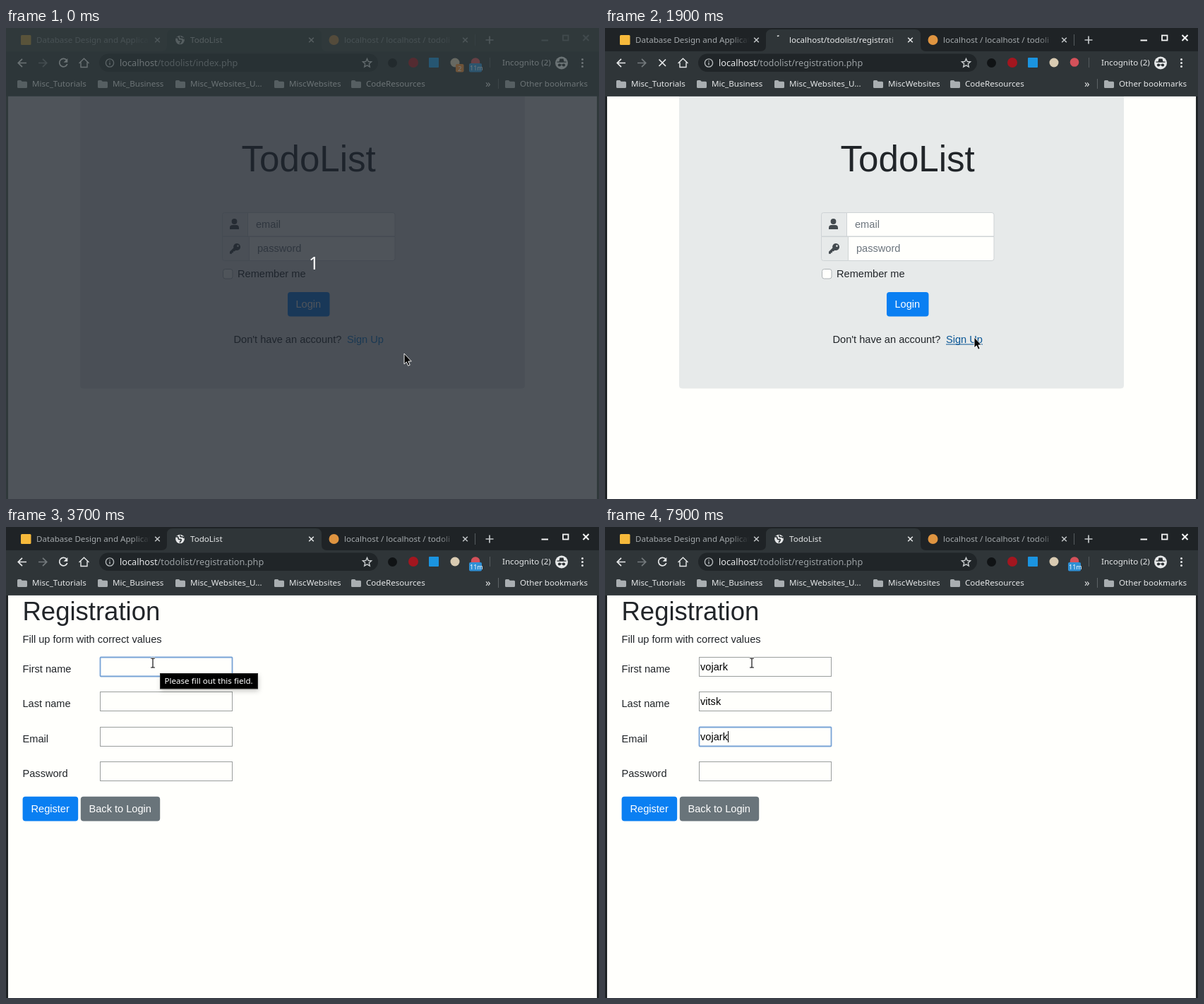
An HTML page for the animation above (8 s loop, 840x667 px).

```html
<!DOCTYPE html>
<html lang="en">
<head>
<meta charset="utf-8">
<title>TodoList</title>
<style>
html, body { margin: 0; width: 100%; height: 100%; overflow: hidden; background: #fffffc; }
svg { display: block; width: 840px; height: 667px; }
.ui { font: 11.6px "Noto Sans", "Open Sans", sans-serif; fill: #e6e8e9; }
.page { font: 14.6px "Liberation Sans", Arial, sans-serif; fill: #212529; }
.url { font-size: 12.7px; }
.soft { fill: #9ba1a4; }
.hint { fill: #6c757d; }
.white { fill: #fff; }
.line { fill: none; stroke: #e6e8e9; stroke-width: 1.7; }
.thin { stroke-width: 1.4; }
.field { fill: #fffffc; stroke: #9a9e9d; }
.box { fill: #fffffc; stroke: #ced3d5; }
.addon { fill: #e7eaea; stroke: #ced3d5; }
.glyph { fill: #434a4f; }
.blue { fill: #0a7ff2; }
</style>
</head>
<body>
<svg viewBox="0 0 840 667" xmlns="http://www.w3.org/2000/svg">
<defs>
  <linearGradient id="fade1" gradientUnits="userSpaceOnUse" x1="176" x2="204">
    <stop stop-color="#a3a8ab"/><stop offset="1" stop-color="#a3a8ab" stop-opacity="0"/>
  </linearGradient>
  <linearGradient id="fade2" gradientUnits="userSpaceOnUse" x1="396" x2="423">
    <stop stop-color="#e6e8e9"/><stop offset="1" stop-color="#e6e8e9" stop-opacity="0"/>
  </linearGradient>
  <linearGradient id="fade3" gradientUnits="userSpaceOnUse" x1="612" x2="639">
    <stop stop-color="#a3a8ab"/><stop offset="1" stop-color="#a3a8ab" stop-opacity="0"/>
  </linearGradient>
  <filter id="shade" x="-20%" y="-40%" width="140%" height="220%">
    <feDropShadow dx="1" dy="3" stdDeviation="3" flood-opacity=".2"/>
  </filter>
  <path id="folder" d="M0 1.5Q0 0 1.5 0H5l1.8 1.8h5.7Q14 1.8 14 3.3v6.2Q14 11 12.500 11h-11Q0 11 0 9.500z" fill="#a9aeb1"/>
  <path id="cross" d="M-3.300-3.300 3.300 3.300M3.300-3.300-3.300 3.300" fill="none" stroke-width="1.500"/>
</defs>

<rect width="840" height="667" fill="#fffffc"/>

<g id="login" class="page">
  <path d="M105 97H735V506q0 4.500-4.500 4.500H109.500q-4.500 0-4.500-4.500z" fill="#e7eaea"/>
  <text x="333.500" y="203.400" font-size="51.100">TodoList</text>
  <path class="addon" d="M342.500 261.500h-33q-3 0-3 3v30.500h36z"/>
  <path class="box" d="M342.500 261.500h205.500q3 0 3 3V295H342.500z"/>
  <path class="addon" d="M306.500 295.500h38v34h-35q-3 0-3-3z"/>
  <path class="box" d="M344.500 295.500h206.500v31q0 3-3 3H344.500z"/>
  <g class="glyph">
    <circle cx="323.500" cy="274" r="3.900"/>
    <path d="M317 285v-2q0-4 4-4h5q4 0 4 4v2z"/>
    <path fill-rule="evenodd" d="M327 305a5 5 0 1 1-1.600 9.700l-1.600 1.600h-1.900v1.900h-1.900v1.500h-3v-3l5.300-5.300A5 5 0 0 1 327 305zm1.400 2.300a1.300 1.300 0 1 0 .1 0z"/>
  </g>
  <text class="hint" x="354" y="283">email</text>
  <text class="hint" x="356" y="317">password</text>
  <rect x="307.500" y="341.500" width="13.500" height="13.500" rx="3" fill="#fffffc" stroke="#adb3b6"/>
  <text x="328" y="353">Remember me</text>
  <rect class="blue" x="399" y="374" width="59.500" height="34.500" rx="4"/>
  <text class="white" x="410.500" y="396">Login</text>
  <text x="322.500" y="446">Don't have an account?</text>
  <text id="link" x="483" y="446">Sign Up</text>
  <path id="under" d="M483 448h52" stroke="#0a5796"/>
</g>

<g id="form" class="page">
  <text x="23.500" y="131.500" font-size="36.500">Registration</text>
  <text x="23.500" y="163.700">Fill up form with correct values</text>
  <g id="rows"></g>
  <rect class="blue" x="23.600" y="381.700" width="78.600" height="34.800" rx="4"/>
  <text class="white" x="35.500" y="404">Register</text>
  <rect x="105.800" y="381.700" width="112.400" height="34.800" rx="4" fill="#69747a"/>
  <text class="white" x="117.500" y="404">Back to Login</text>
  <rect id="ring" x="133.500" width="187" height="27" rx="1" fill="none" stroke="#78a3d6" stroke-width="1.800"/>
  <rect id="caret" width="1" height="16" fill="#000"/>
</g>

<g class="ui">
  <path id="frame" d="M0 0H840V667H837V97H3V667H0z"/>
  <path d="M0 33H220Q228 33 228 25V10Q228 2 236 2H439Q447 2 447 10V25Q447 33 455 33H840V97H0z" fill="#2f3538"/>
  <path d="M3 96.500H837" stroke="#484e51"/>
  <rect x="132" y="36.500" width="395" height="25.500" rx="12.700" fill="#202528"/>

  <rect x="21" y="10" width="14.500" height="14" rx="1.500" fill="#f6b93b"/>
  <text x="43" y="21" fill="url(#fade1)">Database Design and Applicat</text>
  <g id="globe">
    <circle cx="246.500" cy="17" r="6.300"/>
    <path d="M241 14q3-1 3 1.500t3 2-1 4.500M247 11.500q-1 2.500 2 2.500t3 2" fill="none" stroke="#2f3538" stroke-width="1.700"/>
  </g>
  <path id="spin" d="M246.500 11a6 6 0 0 0-2.600.6" class="line"/>
  <text id="tab" x="261" y="21" fill="url(#fade2)"></text>
  <circle cx="464.500" cy="17" r="7" fill="#df9440"/>
  <text x="479" y="21" fill="url(#fade3)">localhost / localhost / todoli</text>
  <g stroke="#c3c7c9">
    <use href="#cross" x="214.500" y="17"/>
    <use href="#cross" x="432.500" y="17" stroke="#e6e8e9"/>
    <use href="#cross" x="650.500" y="17"/>
    <path d="M679.500 17h11M685 11.500v11" stroke-width="1.700"/>
    <path d="M664.500 9v16" stroke="#565c5f"/>
  </g>
  <g id="controls" fill="none" stroke-width="2">
    <path d="M758.500 17.500h9.500"/>
    <rect x="789" y="10.500" width="7.500" height="7" stroke-width="1.800"/>
    <path d="M817.500 10l8 8m0-8-8 8"/>
  </g>

  <path class="line" d="M29 49.500H17.500m5.500-5.700-5.700 5.700 5.700 5.700"/>
  <path class="line" d="M46 49.500h11.500m-5.500-5.700 5.700 5.700-5.700 5.700" style="stroke:#747a7d"/>
  <g id="reload">
    <path class="line" d="M86 45.700a5.700 5.700 0 1 0 .8 5.300"/>
    <path d="M87.300 43v5.700h-5.700z"/>
  </g>
  <path id="stop" class="line" d="M76.500 44.500l9.500 9.500m0-9.500-9.500 9.500"/>
  <path class="line thin" d="M103.500 50l7-6.700 7 6.700M106 48.500V55.500h9V48.500"/>
  <circle class="line thin" cx="147" cy="49.500" r="5.600" style="stroke:#b4b9bb"/>
  <path d="M147 48.800v3.700M147 46.200v1.400" stroke="#b4b9bb" stroke-width="1.400"/>
  <text class="url" x="161" y="54">localhost<tspan id="path" class="soft"></tspan></text>
  <path class="line thin" d="M511.500 43.500l1.700 4 4.400.4-3.300 2.900 1 4.200-3.800-2.200-3.800 2.200 1-4.200-3.300-2.900 4.400-.4z" style="stroke:#c8ccce"/>

  <circle cx="547.500" cy="49.500" r="6.500" fill="#101315"/>
  <circle cx="577" cy="49" r="7" fill="#a3161f"/>
  <rect x="599" y="42" width="14" height="14" rx="1" fill="#1b94e0"/>
  <circle cx="636" cy="49" r="6.500" fill="#d9cbb2"/>
  <circle cx="665" cy="48.500" r="6.300" fill="#d4515a"/>
  <g id="count">
    <rect x="637" y="51" width="11.500" height="11.500" rx="2" fill="#ed8936"/>
    <text x="640" y="60.500" font-size="9.500" class="white">2</text>
  </g>
  <g id="timer">
    <rect x="656" y="50" width="18" height="12.500" rx="2" fill="#2f8fd4"/>
    <text x="657" y="60" font-size="9" class="white">11m</text>
  </g>
  <path d="M685.500 42v14" stroke="#565c5f"/>
  <text x="703" y="53">Incognito (2)</text>
  <circle cx="787" cy="49.500" r="9" fill="#e6e8e9"/>
  <g fill="#2b3033">
    <path d="M783.500 47.500l1-4h5l1 4zM780.500 47.500h13v1.300h-13z"/>
    <circle cx="784" cy="52.500" r="2.100"/><circle cx="790" cy="52.500" r="2.100"/>
    <path d="M785 51.600h4v1h-4z"/>
  </g>
  <circle cx="816.500" cy="44.500" r="1.500"/><circle cx="816.500" cy="49.500" r="1.500"/><circle cx="816.500" cy="54.500" r="1.500"/>

  <g id="marks"></g>
  <text x="679" y="83.500" font-size="15">»</text>
  <path d="M697.500 72v14" stroke="#5d6366"/>
</g>

<g id="tip" class="ui">
  <rect x="218.500" y="207.500" width="138" height="21.500" fill="#000" stroke="#2a2a2a" filter="url(#shade)"/>
  <text class="white" x="224.500" y="222">Please fill out this field.</text>
</g>

<g id="dim">
  <rect x="3" y="97" width="834" height="570" fill="#1e242e" opacity=".78"/>
  <path d="M0 0H840V34H0zM0 97H3V667H0zM837 97H840V667H837z" fill="#2d383a" opacity=".78"/>
  <rect y="34" width="840" height="63" fill="#2d383a" opacity=".66"/>
  <text x="429" y="341.500" class="ui" style="font-size:25px;fill:#fff">1</text>
</g>

<g id="arrow">
  <path d="M0 0V15L3.300 11.900 5.700 17.300 8.200 16.200 5.900 11H10.300z" fill="#0a0a0a" stroke="#fff" stroke-width=".9"/>
</g>
<g id="hand">
  <path d="M0 0q1.900 0 1.900 2v4.600l7 1.100q2.300.5 1.800 3l-1.200 5.300H.3L-3.600 10q-1-2 .8-2l1 .8V2Q-1.800 0 0 0z" fill="#0a0a0a" stroke="#fff" stroke-width=".9"/>
  <path d="M1.500 13.600h6.500" stroke="#fff" stroke-width=".8"/>
</g>
<g id="beam" fill="none">
  <path d="M-3-6.500h2q1 0 1 1v11q0 1-1 1h-2M3-6.500h-2q-1 0-1 1v11q0 1 1 1h2" stroke="#fff" stroke-width="3"/>
  <path d="M-3-6.500h2q1 0 1 1v11q0 1-1 1h-2M3-6.500h-2q-1 0-1 1v11q0 1 1 1h2" stroke="#111" stroke-width="1.200"/>
</g>
</svg>
<script>
const LOOP = 8000;
const $ = id => document.getElementById(id);
const show = (id, on) => { $(id).style.display = on ? '' : 'none'; };
const at = (list, t) => list.filter(e => e[0] <= t).pop();

const words = ['vojark', 'vitsk', 'vojark'];
const rowY = i => Math.round(184 + i * 49.4);

$('rows').innerHTML = ['First name', 'Last name', 'Email', 'Password'].map((label, i) => {
  const y = rowY(i);
  return `<text x="23.5" y="${y + 22}">${label}</text>
    <rect class="field" x="133.5" y="${y + .5}" width="187" height="27"/>
    <text id="in${i}" x="135" y="${y + 19}" fill="#000"></text>`;
}).join('');

$('marks').innerHTML = [
  [16, 'Misc_Tutorials'], [130, 'Mic_Business'], [240, 'Misc_Websites_U...'],
  [380, 'MiscWebsites'], [489, 'CodeResources'], [707, 'Other bookmarks']
].map(([x, s]) => `<use href="#folder" x="${x}" y="74"/><text x="${x + 21}" y="83">${s}</text>`).join('');

// time, pointer shape, x, y
const moves = [
  [0, 'arrow', 564, 461], [100, 'arrow', 565, 463], [400, 'arrow', 557, 462],
  [600, 'arrow', 546, 455], [700, 'hand', 527, 440], [800, 'hand', 519, 438],
  [1000, 'hand', 523, 438], [1800, 'arrow', 523, 438], [2000, 'hand', 523, 438],
  [2400, 'arrow', 440, 385], [2500, 'arrow', 330, 305], [2600, 'beam', 254, 251],
  [2800, 'beam', 239, 243], [2900, 'arrow', 218, 218], [3000, 'beam', 208, 199],
  [3300, 'beam', 208, 192.5]
];

// time, focused field, letters typed
const edits = [
  [3100, 0, 0], [4500, 0, 1], [4700, 0, 2], [4800, 0, 3], [4900, 0, 4], [5200, 0, 6],
  [5300, 1, 0], [5700, 1, 1], [5900, 1, 2], [6000, 1, 3], [6100, 1, 4], [6300, 1, 5],
  [6400, 2, 0], [7200, 2, 1], [7400, 2, 2], [7500, 2, 3], [7600, 2, 4], [7800, 2, 5], [7900, 2, 6]
];

function drawPointer(t) {
  const [, shape, x, y] = at(moves, t);
  for (const id of ['arrow', 'hand', 'beam']) show(id, id === shape);
  $(shape).setAttribute('transform', `translate(${x} ${y})`);
}

function drawFields(t) {
  const edit = at(edits, t);
  const [since, focus, count] = edit || [0, -1, 0];
  words.forEach((word, i) => {
    $('in' + i).textContent = i < focus ? word : i === focus ? word.slice(0, count) : '';
  });
  show('ring', edit);
  show('caret', edit && Math.floor((t - since) / 600) % 2 === 0);
  if (!edit) return;
  $('ring').setAttribute('y', rowY(focus) + .5);
  $('caret').setAttribute('y', rowY(focus) + 6);
  const end = count ? $('in' + focus).getComputedTextLength() : 0;
  $('caret').setAttribute('x', Math.round(135 + end));
}

function drawBrowser(t) {
  const active = t >= 1200, asked = t >= 1800, loading = asked && t < 2000;
  $('frame').setAttribute('fill', active ? '#1f2326' : '#3b4042');
  $('controls').setAttribute('stroke', active ? '#f4f5f5' : '#898e91');
  $('tab').textContent = loading ? 'localhost/todolist/registrati' : 'TodoList';
  $('path').textContent = asked ? '/todolist/registration.php' : '/todolist/index.php';
  show('globe', !loading);
  show('spin', loading);
  show('reload', !loading);
  show('stop', loading);
  show('count', !asked);
  show('timer', !asked || t >= 2200);
}

function draw(t) {
  const hover = t >= 700;
  show('dim', t < 100);
  show('login', t < 2000);
  show('form', t >= 2000);
  show('under', hover);
  $('link').setAttribute('fill', hover ? '#0a5796' : '#0f7fd6');
  show('tip', t >= 3500 && t < 4500);
  drawBrowser(t);
  drawFields(t);
  drawPointer(t);
}

let start;
function tick(now) {
  start ??= now;
  draw((now - start) % LOOP);
  requestAnimationFrame(tick);
}
draw(0);
requestAnimationFrame(tick);
</script>
</body>
</html>
```
